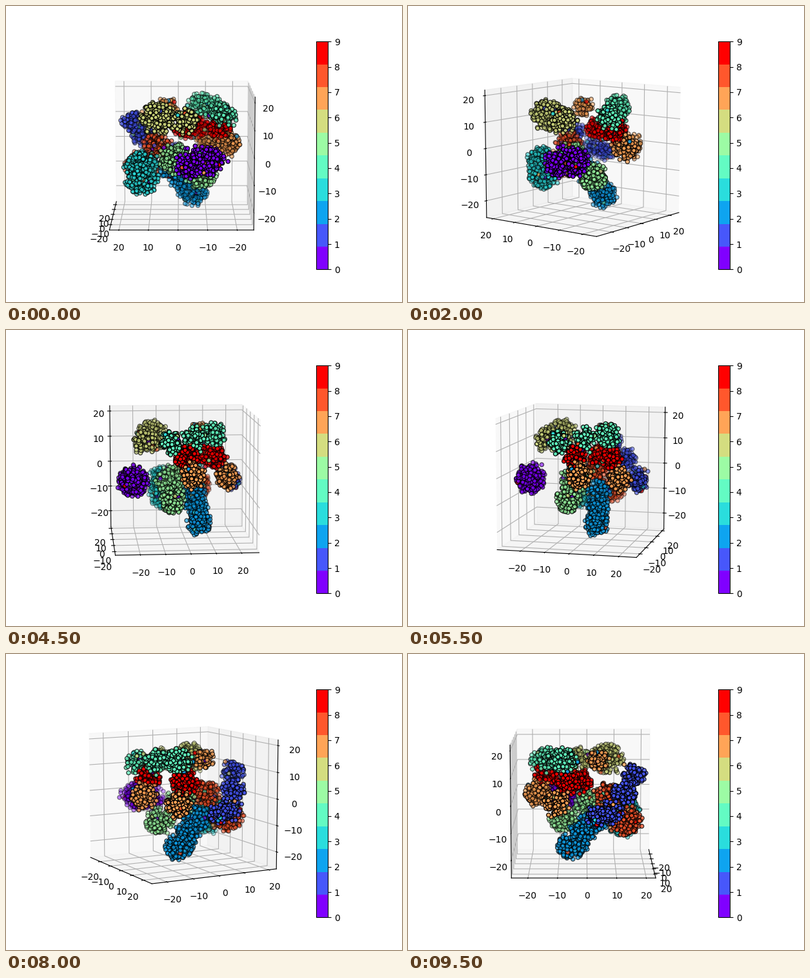
These frames come from a looping animation (614x460 px, 10000 ms). A matplotlib script:

```python
import matplotlib.pyplot as plt
import numpy as np
from matplotlib.animation import FuncAnimation

WIDTH, HEIGHT, DPI = 614, 460, 100
FRAMES, INTERVAL = 20, 500
rng = np.random.default_rng(7)

# label -> blobs given as (x, y, z, radius)
BLOBS = {
    0: [(-21.8, -4.8, -3.0, 5.8), (-21.4, -10.2, -2.2, 5.6)],
    1: [(5.7, 16.0, 8.5, 4.3), (12.8, 12.9, 2.5, 4.3),
        (19.0, 8.0, -3.5, 4.4), (20.3, 3.0, -4.5, 3.6)],
    2: [(5.4, -5.4, -18.7, 5.2), (4.5, -1.5, -13.5, 4.8), (4.0, 2.5, -9.0, 5.0)],
    3: [(-8.0, 12.9, -6.5, 6.0), (-8.0, 12.5, -11.5, 5.8)],
    4: [(-6.9, -16.0, 12.7, 4.4), (2.5, -12.5, 13.7, 4.6), (11.0, -8.2, 14.8, 4.8)],
    5: [(-5.8, -8.2, -10.0, 5.3), (-6.0, 1.0, -4.0, 6.0)],
    6: [(-13.0, 7.0, 12.5, 6.2), (-16.5, -2.5, 11.5, 4.8)],
    7: [(1.5, -17.5, 1.0, 5.0), (16.0, -10.5, -0.8, 4.8), (6.2, 4.0, 14.0, 3.7)],
    8: [(6.5, 13.2, -8.5, 6.0), (1.5, 7.5, 0.0, 5.0)],
    9: [(-1.4, -14.5, 7.5, 4.5), (6.0, -2.5, 6.2, 4.5), (12.0, -7.3, 6.2, 4.3)],
}


def make_blob(x, y, z, radius):
    count = int(6.5 * radius ** 2)
    direction = rng.normal(size=(count, 3))
    direction /= np.linalg.norm(direction, axis=1, keepdims=True)
    reach = radius * rng.random((count, 1)) ** 0.42
    return (x, y, z) + direction * reach + rng.normal(0, 0.4, (count, 3))


def make_cloud():
    points, labels = [], []
    for label, blobs in BLOBS.items():
        for blob in blobs:
            part = make_blob(*blob)
            points.append(part)
            labels.append(np.full(len(part), label))
    points, labels = np.vstack(points), np.concatenate(labels)
    stray = rng.random(len(labels)) < 0.035
    labels[stray] = rng.integers(0, 10, stray.sum())
    return points, labels


points, labels = make_cloud()

# The tiny surplus keeps rounding from dropping a pixel
fig = plt.figure(figsize=((WIDTH + 1e-4) / DPI, (HEIGHT + 1e-4) / DPI), dpi=DPI)
ax = fig.add_subplot(projection="3d")
cloud = ax.scatter(*points.T, c=labels, s=20, edgecolors="k", linewidths=1,
                   cmap=plt.get_cmap("rainbow", 10), vmin=0, vmax=9)
fig.colorbar(cloud, ax=ax, ticks=range(10))

# A unit cube that fills the axes rectangle instead of a square
ax.apply_aspect = lambda position=None: None
ax.set_box_aspect((1, 1, 1), zoom=np.sqrt(3) / 1.8294640721620434)
ax.set(xlim=(-29.8, 27), ylim=(-25.6, 23.2), zlim=(-26.5, 22.1))
for axis in (ax.xaxis, ax.yaxis, ax.zaxis):
    axis.set_ticks(range(-20, 21, 10))

# The ends lie just past the right angles, which decides the visible side wall
azimuths = np.linspace(179.99, 360.01, FRAMES)


def update(frame):
    ax.view_init(elev=10, azim=azimuths[frame])
    return (cloud,)


anim = FuncAnimation(fig, update, frames=FRAMES, interval=INTERVAL,
                     repeat=True, repeat_delay=0, blit=False)
plt.show()
```
